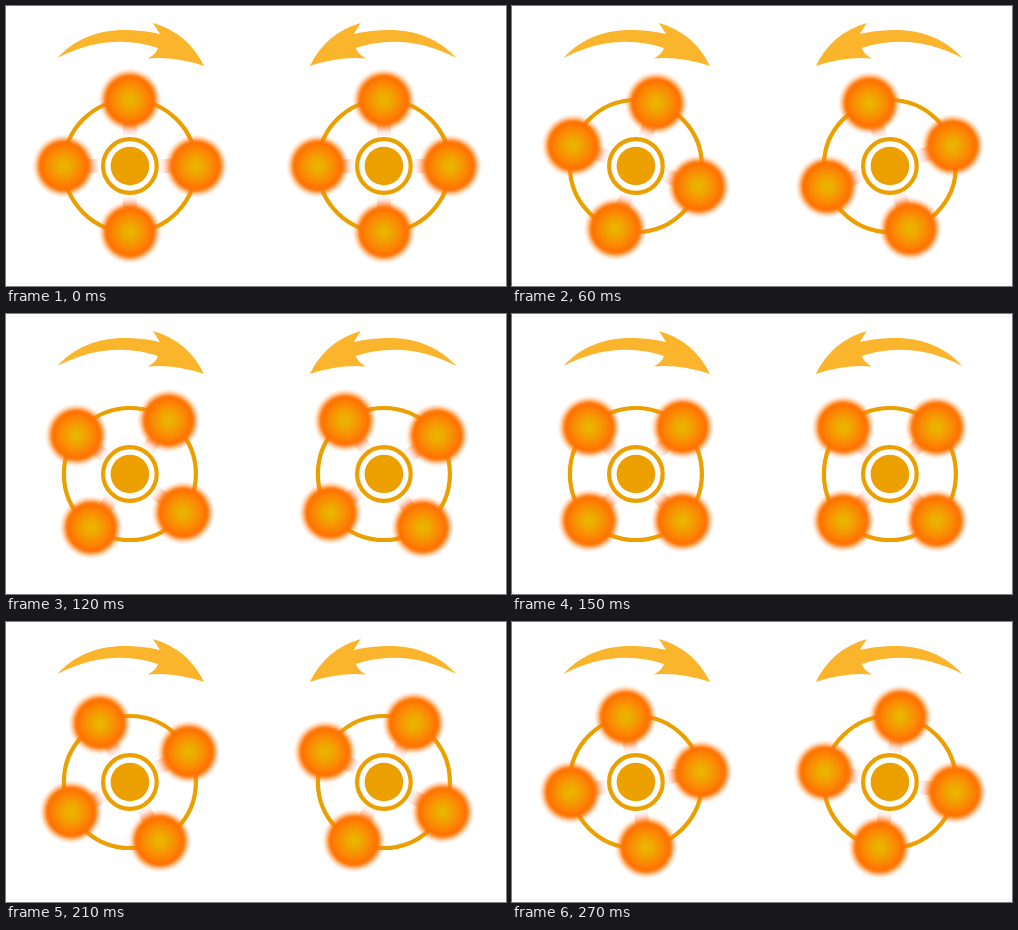
These frames come from a looping animation (500 px wide and 280 px high, 300 ms). An HTML page:

```html
<!DOCTYPE html>
<html lang="en">
<head>
<meta charset="utf-8">
<title>Counter-rotating wheels</title>
<style>
  html, body { margin: 0; width: 100%; height: 100%; overflow: hidden; background: #fff; }
  svg { display: block; width: 500px; height: 280px; }
</style>
</head>
<body>
<svg viewBox="0 0 500 280">
  <defs>
    <radialGradient id="glow">
      <stop offset="0" stop-color="#e8b800"/>
      <stop offset=".2" stop-color="#eeaa00"/>
      <stop offset=".5" stop-color="#fa8a04"/>
      <stop offset=".71" stop-color="#ff7200"/>
      <stop offset=".77" stop-color="#ff7400" stop-opacity=".9"/>
      <stop offset=".86" stop-color="#ff7c10" stop-opacity=".45"/>
      <stop offset=".93" stop-color="#ff8018" stop-opacity=".16"/>
      <stop offset="1" stop-color="#ff8420" stop-opacity="0"/>
    </radialGradient>
    <linearGradient id="fade" x2="0" y2="1">
      <stop offset="0" stop-color="#ff8450" stop-opacity=".65"/>
      <stop offset="1" stop-color="#ff9880" stop-opacity="0"/>
    </linearGradient>
    <g id="ball">
      <rect x="-7" y="-42" width="14" height="13" fill="url(#fade)"/>
      <circle cy="-66" r="32" fill="url(#glow)"/>
    </g>
  </defs>
  <g id="half">
    <path fill="#fbb52c" d="M51.5 52C68 33 94 23 122 24Q140 24.500 154 28L147 17Q182 27 198 60Q168 50 142 52.500Q150 48 152 42C119 31 84 35 51.500 52Z"/>
    <g transform="translate(123.9 160)">
      <g fill="none" stroke="#eca000" stroke-width="4.2">
        <circle r="66"/>
        <circle r="26.800"/>
      </g>
      <circle r="19.300" fill="#eca000"/>
      <g id="wheel">
        <use href="#ball"/>
        <use href="#ball" transform="rotate(90)"/>
        <use href="#ball" transform="rotate(180)"/>
        <use href="#ball" transform="rotate(270)"/>
      </g>
    </g>
  </g>
  <use href="#half" transform="translate(501.8) scale(-1 1)"/>
</svg>
<script>
  const STEP_MS = 30, STEPS = 10, STEP_DEG = 90 / STEPS;
  const wheel = document.getElementById('wheel');
  const start = performance.now();

  function draw() {
    const step = Math.floor((performance.now() - start) / STEP_MS) % STEPS;
    wheel.setAttribute('transform', `rotate(${step * STEP_DEG})`);
    requestAnimationFrame(draw);
  }
  draw();
</script>
</body>
</html>
```
